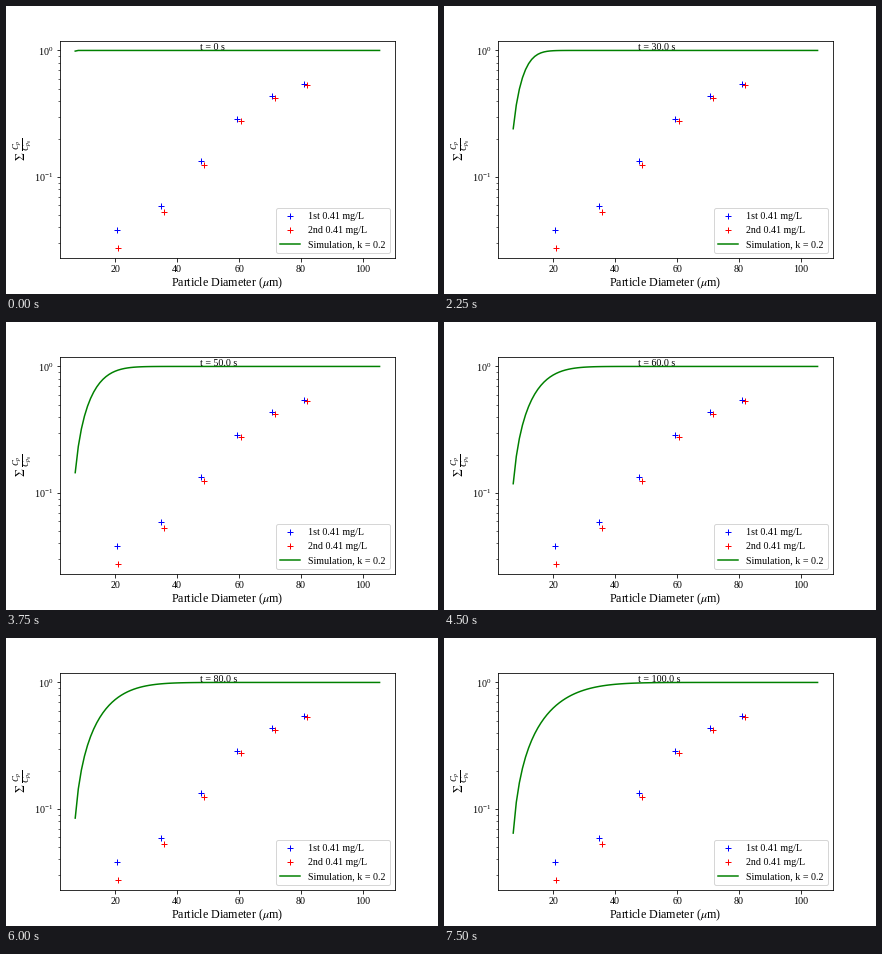
A matplotlib script for the animation above (8000 ms loop, 432 by 288 pixels).

```python
import numpy as np
import matplotlib.pyplot as plt
from matplotlib.animation import FuncAnimation

plt.rcParams.update({
    "font.family": "Liberation Serif",
    "font.size": 10,
    "mathtext.fontset": "stix",
    "axes.labelsize": 12,
})

FRAMES, INTERVAL = 32, 250      # 8 s loop
HOLD, STEP = 3, 10              # frames per state, seconds per state
D_MIN, D_MAX = 7.0, 105.4
LOG_MIN = -1.5626               # lowest measured value, log10


def cumulative(d, t):
    """Share of the total held by particles up to diameter d at time t."""
    t = t + 0.15
    first = (1 + 0.0537 * t) ** -1.48
    w = (d - D_MIN) / t
    return 1 - (1 - first) * np.exp(-5.2 * w - 15 * w ** 2)


def measured(second):
    """Six readings of one run; the second sits slightly right and lower."""
    n = np.arange(6)
    d = 20.6 + 14.72 * n - 0.68 * n ** 2 + 0.03 * n ** 3
    log_y = -1.036 + 0.072 * n + 0.42 * np.tanh((n - 1.95) / 1.3)
    if second:
        d = d + 1 - 0.7 * 0.1 ** n
        log_y = log_y - 0.147 / (1 + n) ** 1.5
    return d, 10 ** log_y


fig, ax = plt.subplots(figsize=(6, 4), dpi=72)
fig.subplots_adjust(left=0.125, right=0.9, bottom=0.125, top=0.88)

ax.plot(*measured(False), "b+", label="1st 0.41 mg/L")
ax.plot(*measured(True), "r+", label="2nd 0.41 mg/L")
d = np.linspace(D_MIN, D_MAX, 100)
curve, = ax.plot(d, cumulative(d, 0), "g", label="Simulation, k = 0.2")
clock = ax.text(47.5, 1, "")

ax.set_yscale("log")
pad = 0.05 * (D_MAX - D_MIN)
ax.set_xlim(D_MIN - pad, D_MAX + pad)
ax.set_ylim(10 ** (1.05 * LOG_MIN), 10 ** (-0.05 * LOG_MIN))
ax.set_xlabel(r"Particle Diameter ($\mu$m)", labelpad=2)
ax.set_ylabel(r"$\Sigma\ \frac{C_p}{C_{p_0}}$", labelpad=-1)
ax.legend(loc="lower right")


def update(i):
    t = i // HOLD * STEP
    curve.set_ydata(cumulative(d, t))
    clock.set_text(f"t = {t:.1f} s" if t else "t = 0 s")
    return curve, clock


anim = FuncAnimation(fig, update, frames=FRAMES, interval=INTERVAL, repeat=True)
plt.show()
```
